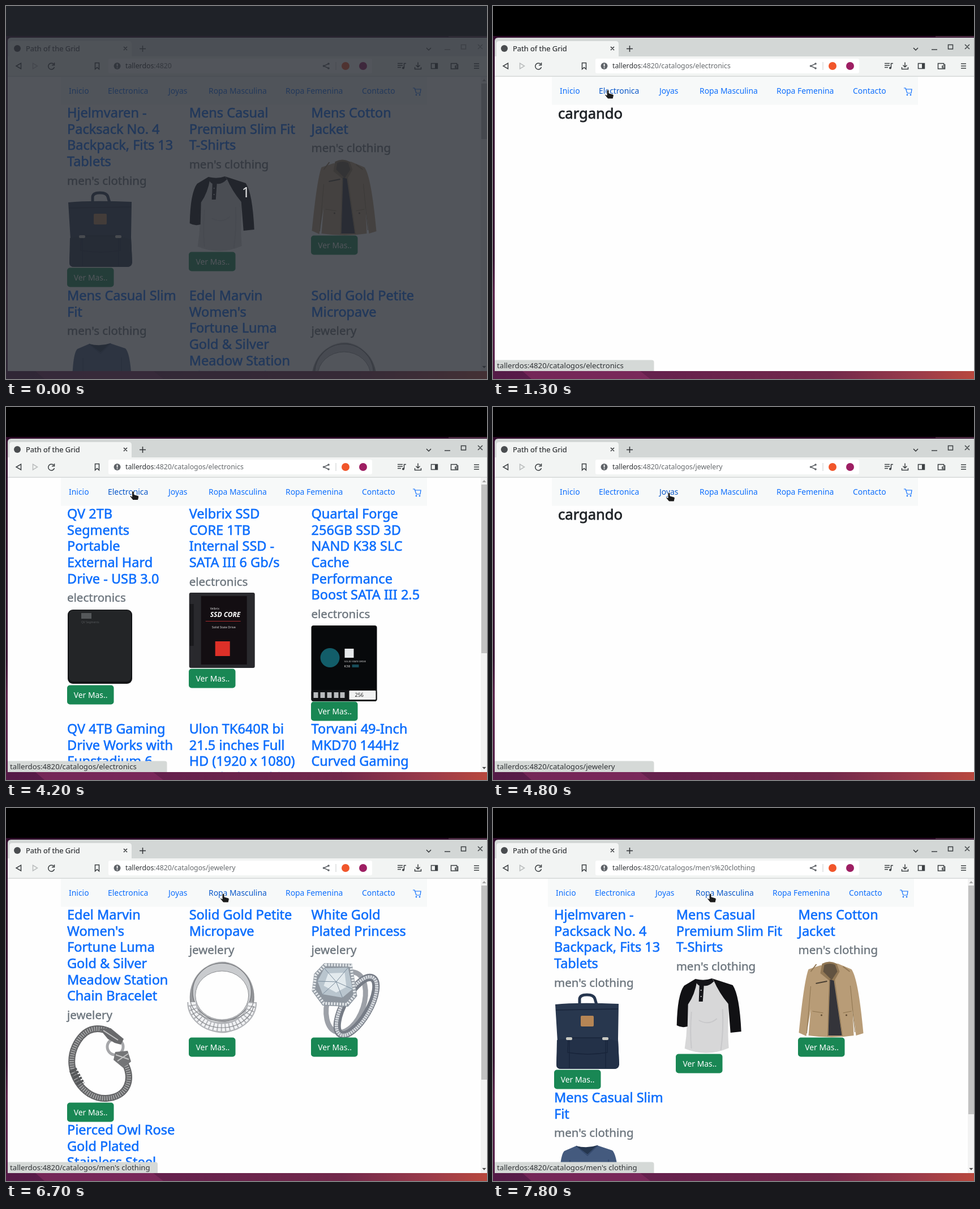
An HTML page that plays this animation: 850x659 px, repeating every 8000 ms.

```html
<!DOCTYPE html>
<html lang="es">
<head>
<meta charset="utf-8">
<title>Tienda</title>
<style>
  html, body { margin: 0; width: 100%; height: 100%; overflow: hidden; background: #000; }
  svg { display: block; width: 850px; height: 659px; }
  text { font-family: "Noto Sans", "Open Sans", sans-serif; white-space: pre; }
  .title { font-size: 23.5px; font-weight: 500; fill: #0d6efd; stroke: #0d6efd; stroke-width: .6; }
  .kind { font-size: 20.5px; font-weight: 500; fill: #6c757d; stroke: #6c757d; stroke-width: .4; }
  .button { font-size: 13.9px; fill: #fff; }
  .link { font-size: 13.9px; fill: #0d6efd; }
  .link.hover { fill: #0a58ca; }
  .loading { font-size: 25.6px; font-weight: 500; fill: #212529; stroke: #212529; stroke-width: .8; }
  .tab { font-size: 12.9px; font-weight: 500; stroke: currentColor; stroke-width: .2; }
  .url { font-size: 12.3px; fill: #666a6d; }
  .status { font-size: 13.2px; fill: #303336; }
  .line { fill: none; stroke: currentColor; stroke-width: 1.5; }
</style>
</head>
<body>
<svg id="stage" viewBox="0 0 850 659"></svg>
<script>
const HOST = 'tallerdos', PORT = ':4820', BASE = '/catalogos/';
const COLUMNS = [108, 323.7, 539.5];
const LINE = 28.7;

const rect = (x, y, w, h, fill, r = 0) =>
  `<rect x="${x}" y="${y}" width="${w}" height="${h}" fill="${fill}" rx="${r}"/>`;
const path = (d, fill, extra = '') => `<path d="${d}" fill="${fill}" ${extra}/>`;
const stroke = (d, color, width = 1, extra = '') =>
  path(d, 'none', `stroke="${color}" stroke-width="${width}" ${extra}`);
const circle = (x, y, r, fill) => `<circle cx="${x}" cy="${y}" r="${r}" fill="${fill}"/>`;
const ellipse = (x, y, rx, ry, attrs) => `<ellipse cx="${x}" cy="${y}" rx="${rx}" ry="${ry}" ${attrs}/>`;
const text = (x, y, content, attrs) => `<text x="${x}" y="${y}" ${attrs}>${content}</text>`;
const small = (x, y, size, content, fill = '#ddd', extra = '') =>
  text(x, y, content, `font-size="${size}" fill="${fill}" ${extra}`);

const chainLoop = 'M73 8Q34 -7 14 35C-6 79 29 129 69 127C107 125 120 91 99 60';
const tilted = (x, y, rx, ry, angle, attrs) =>
  ellipse(x, y, rx, ry, `transform="rotate(${angle} ${x} ${y})" fill="none" ${attrs}`);

// Product pictures, each in a box of 116 by 134
const art = {
  backpack:
    stroke('M45 20V9Q46 2 58 2T72 9L75 19', '#26364f', 5) +
    path('M2 19Q40 15 114 18L113 80L115 125Q114 133 106 133H12Q4 133 4 125L6 85Z', '#28374e') +
    path('M5 82L27 78L92 79L113 84L115 125Q114 133 106 133H12Q4 133 4 125Z', '#233148') +
    stroke('M3 29L113 27M25 78H94V104Q60 110 24 104ZM27 82V131M91 82V131', '#18243a', 1.3) +
    rect(47, 39, 23, 19, '#b58555', 2) +
    rect(21, 77, 11, 5, '#c9c9c2', 2) + rect(85, 77, 11, 5, '#c9c9c2', 2),
  raglan:
    path('M35 5L68 3L94 38Q90 90 93 124Q54 141 15 125Q22 82 17 42Z', '#d7d7d8') +
    stroke('M27 60Q24 95 27 125M82 55Q84 90 79 128M40 75Q58 85 72 72', '#c8c8ca', 2) +
    path('M34 2L14 14Q2 30 1 84Q10 89 20 86L21 47Q33 30 37 5Z', '#111114') +
    path('M63 1L100 13Q112 31 115 95L96 97L92 46Q76 27 66 4Z', '#111114') +
    path('M34 2Q50 6 63 1L67 6Q57 16 49 14L47 42H40L41 14Q35 11 34 2Z', '#151519') +
    circle(44, 22, 1, '#eee') + circle(44, 33, 1, '#eee'),
  jacket:
    path('M39 7L18 14Q10 35 1 126L14 132L22 84L18 131Q60 137 98 131L96 85L102 131L115 127Q106 30 94 14L70 4Z', '#b89c77') +
    path('M42 4Q55 -3 68 4L73 18L61 39L39 21Z', '#927855') +
    path('M46 6Q56 2 65 6L69 18L59 33L44 18Z', '#625341') +
    path('M56 32L63 34L77 131H53Z', '#34343a') +
    stroke('M22 44L15 127M92 43L100 125M55 31L52 132M64 31L78 132M25 88L44 91M79 91L94 88', '#8d744f') +
    stroke('M31 39L51 35', '#4a4033', 2) + stroke('M32 5L22 18M79 9L91 18', '#927855', 2) +
    circle(41, 95, 1.5, '#5e4b33') + circle(85, 95, 1.5, '#5e4b33'),
  sweater:
    path('M39 3L18 12Q10 20 9 70L26 75V132H98V75L114 70Q112 20 103 11L76 2Q60 10 39 3Z', '#445a7e') +
    path('M39 3Q58 8 76 2L59 18Z', '#25364f') +
    stroke('M39 3L59 20L77 2M28 28V75M96 27V75', '#32476a', 1.5),
  ring:
    ellipse(58, 63.5, 57, 63, 'fill="url(#silver)"') +
    ellipse(58, 54, 52, 51, 'fill="#c9cbce" stroke="#77797d" stroke-width="1.5"') +
    ellipse(58, 60, 47, 43, 'fill="#fefefe" stroke="#8b8d91"') +
    stroke('M5 72A53 45 0 0 0 111 72', '#b1b3b7', 17) +
    stroke('M5 72A53 45 0 0 0 111 72', '#f1f2f4', 13, 'stroke-dasharray="5 2"') +
    stroke('M2 66A56 39 0 0 0 114 66M2 79A57 47 0 0 0 114 79', '#85878b', 1.2),
  bracelet:
    stroke(chainLoop, '#626365', 12) +
    stroke(chainLoop, '#a3a4a5', 8, 'stroke-dasharray="2 2"') +
    stroke('M10 76L25 103', '#555759', 14, 'stroke-dasharray="4 2"') +
    ellipse(85, 36, 14, 14, 'fill="none" stroke="#a5a6a9" stroke-width="5"') +
    path('M57 4L77 3L100 22L95 32L84 29L72 22Z', '#68696b') +
    path('M85 45L107 43L113 62L99 73L82 59Z', '#747577') +
    stroke('M64 7L90 24M86 50L109 58M89 61L108 48', '#c4c4c4', 2),
  princess:
    tilted(61, 72, 32, 55, 18, 'stroke="#9da1a8" stroke-width="9"') +
    tilted(80, 79, 22, 57, 30, 'stroke="#767c86" stroke-width="13"') +
    tilted(80, 79, 24, 58, 30, 'stroke="#d5d9de" stroke-width="6" stroke-dasharray="3 1"') +
    path('M23 3L72 4L81 61L65 80L20 78L1 52L5 22Z', '#8e969f') +
    stroke('M25 6L70 7L77 60L63 76L22 74L4 50L8 24Z', '#e2e6e9', 5, 'stroke-dasharray="3 2"') +
    path('M23 12L65 11L73 49L55 64L20 58L11 35Z', '#b9c5ce') +
    path('M30 21L59 20L62 45L44 55L22 43Z', '#e3eaee') +
    stroke('M23 12L44 36L65 11M11 35L44 36L73 49M20 58L44 36L55 64', '#788a9a'),
  drive:
    rect(1, 1, 114, 131, '#131416', 9) + rect(3, 2, 110, 126, '#232527', 8) +
    rect(25, 7, 18, 10, '#55585a') + small(25, 25, 5, 'QV Segments', '#55585b'),
  ssd:
    rect(0, 0, 116, 133, '#29292d', 3) + rect(1, 20, 7, 74, '#19191c') + rect(21, 6, 81, 121, '#130e12') +
    small(37, 30, 5, 'Velbrix') +
    small(37, 43, 12, 'SSD CORE', '#fff', 'font-weight="700" font-style="italic"') +
    rect(29, 50, 62, 1, '#a52b2d') + small(40, 63, 5.5, 'Solid State Drive') +
    rect(46, 86, 26, 26, '#dd3028'),
  chip:
    rect(0, 0, 116, 134, '#07090b', 4) + rect(0, 114, 116, 20, '#121416', 4) +
    circle(33, 57, 17, '#125d69') + rect(59, 41, 16, 16, '#e5e8ea') +
    small(58, 65, 4.3, 'SOLID STATE DRIVE') + small(58, 74, 6, 'K38') + rect(72, 69, 12, 5, '#174c59') +
    [4, 16, 28, 40, 51].map(x => rect(x, 118, 8, 10, '#b9bcbe')).join('') +
    rect(67, 115, 47, 16, '#f1f2f2', 1) + small(77, 126, 9, '256', '#222'),
};

function card(column, top, title, kind, picture) {
  const lines = title.split('|'), x = COLUMNS[column];
  const end = top + LINE * lines.length, y = Math.round(end + 39.5);
  return lines.map((s, i) => text(x, top + 22.8 + LINE * i, s, 'class="title"')).join('') +
    text(x, end + 26.7, kind, 'class="kind"') +
    `<g class="art" transform="translate(${x} ${y})">${art[picture] || ''}</g>` +
    rect(Math.floor(x), y + 134.5, 82.5, 34, '#198754', 5) +
    text(x + 11.7, y + 156.5, 'Ver Mas..', 'class="button"');
}

const MEN = "men's clothing";
const menCards =
  card(0, 174, 'Hjelmvaren -|Packsack No. 4|Backpack, Fits 13|Tablets', MEN, 'backpack') +
  card(1, 174, 'Mens Casual|Premium Slim Fit|T-Shirts', MEN, 'raglan') +
  card(2, 174, 'Mens Cotton|Jacket', MEN, 'jacket') +
  card(0, 497, 'Mens Casual Slim|Fit', MEN, 'sweater');
const braceletTitle = "Edel Marvin|Women's|Fortune Luma|Gold &amp; Silver|Meadow Station|Chain Bracelet";
const ringTitle = 'Solid Gold Petite|Micropave';

const pages = {
  home: menCards +
    card(1, 497, braceletTitle, 'jewelery', 'bracelet') +
    card(2, 497, ringTitle, 'jewelery', 'ring'),
  electronics:
    card(0, 174, 'QV 2TB|Segments|Portable|External Hard|Drive - USB 3.0', 'electronics', 'drive') +
    card(1, 174, 'Velbrix SSD|CORE 1TB|Internal SSD -|SATA III 6 Gb/s', 'electronics', 'ssd') +
    card(2, 174, 'Quartal Forge|256GB SSD 3D|NAND K38 SLC|Cache|Performance|Boost SATA III 2.5', 'electronics', 'chip') +
    card(0, 554, 'QV 4TB Gaming|Drive Works with|Funstadium 6', 'electronics') +
    card(1, 554, 'Ulon TK640R bi|21.5 inches Full|HD (1920 x 1080)|Panel Ultra-Thin', 'electronics') +
    card(2, 554, 'Torvani 49-Inch|MKD70 144Hz|Curved Gaming|Monitor', 'electronics'),
  jewelery:
    card(0, 174, braceletTitle, 'jewelery', 'bracelet') +
    card(1, 174, ringTitle, 'jewelery', 'ring') +
    card(2, 174, 'White Gold|Plated Princess', 'jewelery', 'princess') +
    card(0, 554, 'Pierced Owl Rose|Gold Plated|Stainless Steel', 'jewelery'),
  men: menCards,
  loading: text(115, 199, 'cargando', 'class="loading"'),
};
const thumbEnd = { home: 235, electronics: 435, jewelery: 480, men: 541 };

const links = [[111, 'Inicio'], [180, 'Electronica'], [287, 'Joyas'], [358, 'Ropa Masculina'],
  [494, 'Ropa Femenina'], [629, 'Contacto']];
const nav = rect(97, 125, 647, 49.5, '#f7f9f9') +
  links.map(([x, s]) => text(x, 154.5, s, 'class="link"')).join('') +
  stroke('M719 145H722L725 154H732L733 147H723', '#0d6efd', 1.2) +
  circle(725, 157, 1.3, '#0d6efd') + circle(731, 157, 1.3, '#0d6efd');

const line = (d, color = '#3c4043') => `<path class="line" color="${color}" d="${d}"/>`;
const desktop = rect(0, 0, 850, 659, '#000') + rect(0, 53, 850, 606, 'url(#side)') +
  rect(782, 53, 68, 2, '#513047') + rect(0, 645, 850, 14, 'url(#floor)') +
  path('M52 645H260L278 659H68Z', '#8b3064', 'opacity=".55"');
const chrome =
  '<path id="frame" d="M3 125V62Q3 56 9 56H850V125Z"/>' +
  path('M6 90V67Q6 62 11 62H217Q222 62 222 67V90Z', '#f2f4f3') + rect(3, 89, 847, 35, '#f2f4f3') +
  rect(3, 123.5, 847, 1, '#d7dada') + rect(181, 93, 466, 26, '#fff', 3) +
  circle(20, 75, 6, '#4a4d50') +
  `<g id="caption">${text(35, 80, 'Path of the Grid', 'class="tab" fill="currentColor"')}
    <path class="line" d="M208 72L214 78M214 72L208 78M236 75.500H247M241.500 70V81M743 74L747 78L751 74"/></g>` +
  '<path id="controls" class="line" d="M775 77H785M804.500 68.500H812.500V76H804.500ZM834 68L842 76M842 68L834 76"/>' +
  line('M26.500 101V111L18 106Z') + line('M47.500 101V111L55.500 106Z', '#b9bcbc') +
  line('M84.500 103A5.500 5.500 0 1 0 85.500 108M85.500 100V104.500H81') +
  line('M157.500 100.500H164.500V111.500L161 108.500L157.500 111.500Z') +
  circle(196.5, 106, 6, '#5f6368') + rect(195.7, 102, 1.7, 5, '#fff') + rect(195.7, 108.3, 1.7, 1.7, '#fff') +
  line('M570 102L561.500 106L570 110', '#5f6368') +
  [[570, 102], [561.5, 106], [570, 110]].map(([x, y]) => circle(x, y, 1.8, '#5f6368')).join('') +
  rect(582.5, 99, 1, 14, '#c9cccc') + circle(600, 106, 7, '#f1562b') + circle(631, 106, 7, '#9e1f63') +
  line('M692 101.500H701M692 105H701M692 108.500H698M703.500 109V101.500H707') + circle(702, 109.5, 2, '#3c4043') +
  line('M728 99.500V107.500M724.500 104.500L728 108L731.500 104.500M722.500 108V111.500H733.500V108') +
  line('M751.500 101.500H762.500V110.500H751.500Z') + rect(758, 101, 5, 10, '#3c4043') +
  line('M786.500 103.500V101.500H796.500V103.500H798.500V111H786.500ZM798.500 106H794V109H798.500') +
  line('M827 102H836M827 106H836M827 110H836') +
  `<text x="211" y="110.300" class="url"><tspan fill="#303336">${HOST}</tspan>${PORT}<tspan id="route"></tspan></text>`;

const stage = document.getElementById('stage');
stage.innerHTML = `<defs>
  <clipPath id="view"><rect x="3" y="125" width="847" height="520"/></clipPath>
  <linearGradient id="side" x2="0" y2="1"><stop stop-color="#2e0a29"/><stop offset=".65" stop-color="#35102f"/><stop offset=".75" stop-color="#5a2049"/><stop offset="1" stop-color="#501a43"/></linearGradient>
  <linearGradient id="floor"><stop stop-color="#541a47"/><stop offset=".3" stop-color="#64204d"/><stop offset=".7" stop-color="#72294b"/><stop offset=".88" stop-color="#9a3b4a"/><stop offset="1" stop-color="#b8483e"/></linearGradient>
  <linearGradient id="silver"><stop stop-color="#8d8f93"/><stop offset=".25" stop-color="#eceded"/><stop offset=".55" stop-color="#a6a8ac"/><stop offset=".8" stop-color="#f1f1f2"/><stop offset="1" stop-color="#85878b"/></linearGradient>
</defs>
${desktop}${chrome}
<g clip-path="url(#view)">
  ${rect(3, 125, 847, 520, '#fefefe')}
  <g id="nav">${nav}</g>
  ${Object.entries(pages).map(([name, body]) => `<g id="${name}">${body}</g>`).join('')}
  <g id="scrollbar">${rect(839, 125, 11, 520, '#f3f3f3')}<rect id="thumb" x="840" y="137" width="10" fill="#c1c1c1"/>
    ${path('M841.500 133L845 129L848.500 133Z', '#a3a3a3')}${path('M841.500 636L845 640L848.500 636Z', '#505050')}</g>
  <g id="bubble"><path id="bubbleShape" fill="#d5d9d7"/><text id="target" x="7" y="640" class="status"></text></g>
</g>
<g id="cursor" stroke="#fff" stroke-width="1" stroke-linejoin="round" fill="#1c1c1c">
  <path id="arrow" d="M0 0V15L4 11.500L7 17L9.500 16L7 10.500H12Z"/>
  <path id="hand" d="M-2 1Q-2 -1 0 -1T2 1V5L9 7Q11 8 10 11L9 15H0L-5 9Q-6 7 -4 7L-2 9Z"/>
</g>
<g id="countdown">${rect(0, 0, 850, 659, 'rgba(39,43,50,.8)')}${small(424, 338, 25, '1', '#e4e5e6', 'text-anchor="middle"')}</g>`;

const $ = id => document.getElementById(id);
const show = (node, on) => node.setAttribute('visibility', on ? 'visible' : 'hidden');
const at = (steps, t) => steps.findLast(([start]) => t >= start)[1];
const linkNodes = [...$('nav').querySelectorAll('.link')];
const menPictures = [...$('men').querySelectorAll('.art')];

const pageSteps = [[0, 'home'], [1300, 'loading'], [2900, 'electronics'], [4800, 'loading'],
  [5600, 'jewelery'], [6900, 'loading'], [7500, 'men']];
const routeSteps = [[0, ''], [1300, 'electronics'], [4800, 'jewelery'], [6900, "men's%20clothing"]];
const targetSteps = [[0, ''], [1100, 'electronics'], [4500, 'jewelery'], [6300, MEN]];
const hovers = [[1, 1100, 4400], [2, 4500, 6700], [3, 6300, 8000]];
const moves = [[400, 1200, 682, 330, 203, 149], [4000, 4700, 203, 149, 311, 152], [6100, 6400, 311, 152, 384, 152]];

function cursorAt(t) {
  const [start, end, x0, y0, x1, y1] = moves.findLast(m => t >= m[0]) || moves[0];
  const p = Math.min(1, Math.max(0, (t - start) / (end - start)));
  const e = p * p * (3 - 2 * p);
  return [x0 + (x1 - x0) * e, y0 + (y1 - y0) * e];
}

function draw(time) {
  const t = Math.floor(time % 8000 / 100) * 100;
  const page = at(pageSteps, t), route = at(routeSteps, t), target = at(targetSteps, t);
  const loading = page === 'loading', active = t >= 1300;

  for (const name in pages) $(name).style.display = name === page ? '' : 'none';
  $('nav').setAttribute('transform', `translate(${loading ? 7 : 0} 0)`);
  show($('scrollbar'), !loading);
  $('thumb').setAttribute('height', (thumbEnd[page] || 137) - 137);
  menPictures.forEach((node, i) => show(node, t >= (i < 2 ? 7700 : 7800)));

  $('frame').setAttribute('fill', active ? '#d3d7d6' : '#dee1e1');
  $('caption').setAttribute('color', active ? '#303336' : '#505356');
  $('controls').setAttribute('color', active ? '#3c4043' : '#929596');
  $('route').textContent = route && BASE + route;

  show($('bubble'), target);
  const right = t >= 6300 && t < 6900 ? 268 : 284.5;
  $('bubbleShape').setAttribute('d', `M3 625.500H${right - 4}Q${right} 625.500 ${right} 629.500V645H3Z`);
  $('target').textContent = HOST + PORT + BASE + target;

  const hovered = hovers.filter(([, from, to]) => t >= from && t < to).map(h => h[0]);
  linkNodes.forEach((node, i) => node.classList.toggle('hover', hovered.includes(i)));
  const [x, y] = cursorAt(t);
  const overLink = links.slice(1, 4).some(([left], i) => x >= left && x < left + [73, 37, 102][i] && y < 165);
  $('cursor').setAttribute('transform', `translate(${x} ${y})`);
  show($('hand'), t >= 400 && overLink);
  show($('arrow'), t >= 400 && !overLink);
  show($('countdown'), t < 100);
}

function tick() {
  draw(performance.now());
  requestAnimationFrame(tick);
}
tick();
</script>
</body>
</html>
```
